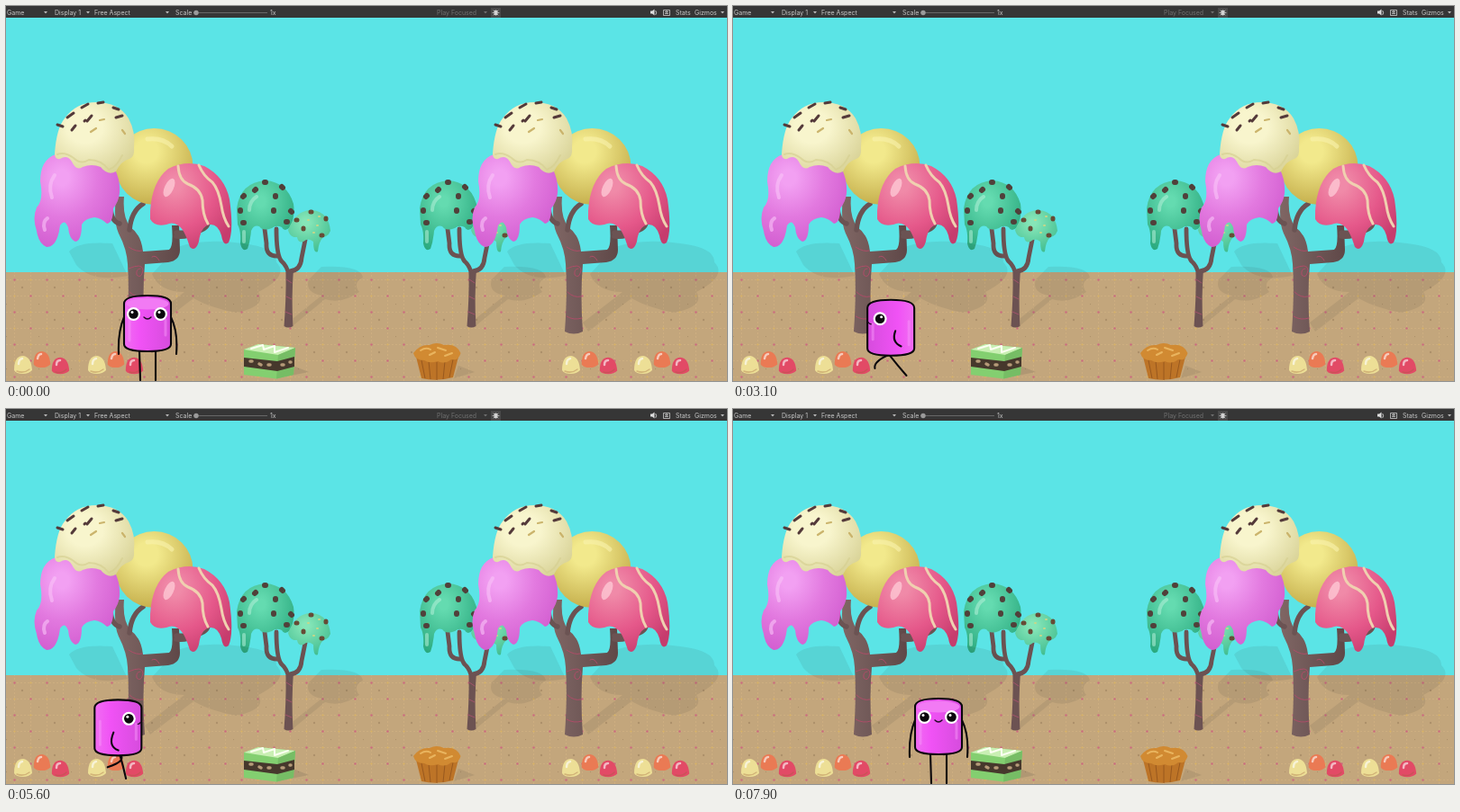
Recreate the animation shown at these times as an HTML page. Size 800x417 px, loop 8000 ms.

```html
<!DOCTYPE html>
<html lang="en">
<head>
<meta charset="utf-8">
<title>Candy walk</title>
<style>
html, body { margin: 0; height: 100%; overflow: hidden; background: #5be4e6; }
svg { display: block; width: 100%; height: 100%; }
text { font: 7px Inter, "Open Sans", sans-serif; fill: #c8c8c8; }
.line { fill: none; stroke-linecap: round; stroke-linejoin: round; }
.ink { stroke: #0b080c; stroke-width: 2.1; }
</style>
</head>
<body>
<svg viewBox="0 0 800 417" preserveAspectRatio="none">
<defs>
  <radialGradient id="cream" cx=".38" cy=".35" r=".75"><stop offset=".3" stop-color="#f8f5cd"/><stop offset="1" stop-color="#d8d296"/></radialGradient>
  <radialGradient id="lemon" cx=".4" cy=".3" r=".75"><stop offset=".2" stop-color="#f2e98c"/><stop offset="1" stop-color="#c2ab48"/></radialGradient>
  <radialGradient id="pink" cx=".32" cy=".25" r=".85"><stop offset=".1" stop-color="#f2a0f2"/><stop offset=".5" stop-color="#e279df"/><stop offset="1" stop-color="#cf58cd"/></radialGradient>
  <radialGradient id="berry" cx=".3" cy=".25" r=".85"><stop offset=".1" stop-color="#f08aa8"/><stop offset=".6" stop-color="#e5588a"/><stop offset="1" stop-color="#c63c6d"/></radialGradient>
  <radialGradient id="mint" cx=".42" cy=".3" r=".75"><stop offset=".1" stop-color="#64dbb0"/><stop offset="1" stop-color="#2aa97e"/></radialGradient>
  <radialGradient id="mint2" cx=".42" cy=".3" r=".75"><stop offset=".1" stop-color="#86e6b8"/><stop offset="1" stop-color="#41bd90"/></radialGradient>
  <linearGradient id="bark"><stop offset="0" stop-color="#7f6664"/><stop offset="1" stop-color="#5f4848"/></linearGradient>
  <linearGradient id="mallow"><stop offset="0" stop-color="#f16df2"/><stop offset=".35" stop-color="#f052f5"/><stop offset="1" stop-color="#d64cdd"/></linearGradient>

  <pattern id="waffle" width="36" height="36" y="295" patternUnits="userSpaceOnUse">
    <path d="M0 9.5H36M0 27.5H36M9.5 0V36M27.5 0V36" stroke="#cdae80" stroke-width="1" stroke-dasharray="2 2"/>
    <g fill="#cb6c7e"><circle cx="9.5" cy="9.5" r="1.2"/><circle cx="27.5" cy="27.5" r="1.2"/></g>
    <g fill="#d8b264"><circle cx="27.5" cy="9.5" r="1.1"/><circle cx="9.5" cy="27.5" r="1.1"/></g>
    <g fill="#ac906a"><circle cx="18" cy="18" r="1.2"/><circle cx="0" cy="0" r="1.2"/></g>
  </pattern>

  <g id="bigTree">
    <path d="M70 273Q80 261 118 264L135 300Q95 308 78 288ZM154 352L198 318Q170 318 162 298L190 268Q220 258 262 264Q300 268 300 285Q315 300 280 318Q290 334 255 341Q225 335 208 325L160 362Z" fill="#302f35" opacity=".09"/>
    <path d="M134 362Q137 320 135 287Q134 270 125 253Q119 240 122 212H131Q129 234 138 246Q150 254 152 273L181 271Q186 268 184 244H192L193 271Q193 283 180 285L154 287Q151 322 154 362Q144 367 134 362Z" fill="url(#bark)"/>
    <path class="line" d="M126 242Q115 239 116 218M137 249Q139 228 152 220M189 256Q206 258 213 246M189 252Q220 254 224 242" stroke="#6b5353" stroke-width="5.500"/>
    <path class="line" d="M136 268Q145 274 151 272M136 292Q152 285 152 294Q150 304 145 299Q144 292 149 292M137 318Q144 325 152 323M136 345Q144 350 153 347M162 279Q166 276 170 283" stroke="#ad4d68" stroke-width="1"/>
    <ellipse cx="164.500" cy="178.500" rx="43" ry="42.500" fill="url(#lemon)"/>
    <path class="line" d="M157 148Q174 146 184 156" stroke="#faf4ae" stroke-width="5" opacity=".6"/>
    <path d="M38 195Q38 171 55 165H110Q117 172 121 182Q127 194 126 208Q125 218 119 225Q119 241 112 242Q106 236 98 235Q88 236 84 243Q84 261 77 262Q70 259 69 246Q65 236 60 244Q57 268 45 268Q36 264 34 250Q29 236 34 224Q42 216 38 195Z" fill="url(#pink)"/>
    <path class="line" d="M54 188Q46 199 51 213M46 236Q40 240 43 249" stroke="#fbc4f9" stroke-width="4" opacity=".6"/>
    <path d="M160 228Q162 195 180 181Q200 171 220 178Q243 190 248 215Q253 250 247 263Q241 268 239 255Q235 242 226 243Q216 245 214 262Q210 274 204 268Q200 255 196 249Q188 238 178 243Q165 246 160 237Z" fill="url(#berry)"/>
    <path class="line" d="M191 178Q192 194 202 198Q216 203 218 216Q218 232 224 242M214 177Q219 189 229 196Q236 204 239 222Q241 236 247 245" stroke="#f0d0b0" stroke-width="3"/>
    <ellipse cx="181" cy="202" rx="5" ry="11" transform="rotate(25 181 202)" fill="#ffd0da" opacity=".7"/>
    <path d="M54 164Q56 136 65 125Q78 107 100 107Q125 107 136 125Q144 140 142 157Q143 168 137 170Q128 172 122 184Q113 189 105 179Q95 175 85 179Q78 184 73 173Q68 165 60 170Q54 171 54 164Z" fill="url(#cream)"/>
    <path class="line" d="M57 165Q65 162 75 169Q83 177 92 171Q106 171 114 182Q122 180 129 166" stroke="#d6d091" stroke-width="2" opacity=".65"/>
    <path class="line" d="M84 113L91 109M102 108L108 107M119 113L125 115M68 124L75 119M90 128L95 122M57 132L63 134M73 138L77 133M122 124L129 122M88 127L87 128" stroke="#543a3a" stroke-width="3"/>
    <path class="line" d="M104 127L109 126M94 140L100 136M129 138L132 142" stroke="#cbb46c" stroke-width="2.200"/>
  </g>

  <g id="mintTree">
    <path d="M319 347L350 322Q331 318 336 304L350 290Q394 288 396 302Q384 308 392 318Q372 332 354 326L319 355Z" fill="#302f35" opacity=".09"/>
    <path d="M308.500 356Q311 325 310.500 296L319 292Q316.500 325 318.500 356Q313 359 308.500 356Z" fill="#6c5252"/>
    <path class="line" d="M314 300Q312 289 306 284Q300 278 300 248M302 278Q288 279 289 264L287 248M315 295Q327 294 328 280L332 260" stroke="#6c5252" stroke-width="4.800"/>
    <path class="line" d="M311 304L317 308M311 323L317 326M310 340L317 343" stroke="#a2526a" stroke-width="1"/>
    <path d="M256 225Q260 196 288 194Q312 196 319 220Q321 235 315 246Q309 252 306 246Q300 243 295 247Q285 251 281 245Q275 243 272 250Q271 262 268 270Q262 274 260 264Q261 250 257 243Z" fill="url(#mint)"/>
    <path class="line" d="M278 212Q270 217 270 227M264 251V262" stroke="#b4f0d9" stroke-width="4" opacity=".55"/>
    <path d="M313 249Q322 226 340 227Q358 229 360 250Q358 256 352 257Q347 262 346 273Q341 276 341 262Q335 257 330 262Q324 264 323 257Q315 258 313 249Z" fill="url(#mint2)"/>
    <path class="line" d="M287 196h1M306 201l1 1M276 205l1-1M263 212l1-1M299 211v1M316 228l1 1M260 227v1M297 227v1M263 241h1M311 240h1" stroke="#51403a" stroke-width="6"/>
    <path class="line" d="M338 229h1M330 247v1M355 236v1M350 255h1M322 238h1" stroke="#674b36" stroke-width="5"/>
    <path class="line" d="M335 238h1M345 244h1M341 252h1M347 234h1" stroke="#c7d789" stroke-width="2"/>
  </g>

  <path id="drop" d="M-10 6Q-10-10 0-10Q9-9 10 6Q6 10 0 10Q-8 10-10 6Z"/>
  <g id="candies">
    <use href="#drop" transform="translate(40 393) scale(.93 .9)" fill="#ea7a54"/>
    <use href="#drop" x="19" y="399" fill="#eddf96"/>
    <use href="#drop" transform="translate(60.500 400) scale(.97 .93)" fill="#e24a66"/>
    <path class="line" d="M14 398Q14 393 18 392M35 392Q36 387 39 387M56 399Q56 394 60 394" stroke="#fff" stroke-width="2.500" opacity=".6"/>
    <path class="line" d="M12 406Q20 409 26 404M55 407Q62 409 67 404" stroke="#9d623e" stroke-width="1.500" opacity=".35"/>
  </g>

  <g id="body">
    <path class="ink" d="M-26 331Q-26 322 0 322Q26 322 26 331V376Q26 384 0 384Q-26 384-26 376Z" fill="url(#mallow)"/>
    <path class="line" d="M-20 346V372M20 349V366" stroke="#f894f9" stroke-width="3" opacity=".5"/>
  </g>
  <g id="upright">
    <path class="line ink" d="M-26 346Q-33 362-32 387M26 346Q34 362 32 387M-9 383L-8 416M9 383V416"/>
    <use href="#body"/>
    <ellipse cy="331" rx="23.500" ry="6.500" fill="#f27af4"/>
  </g>
  <g id="eye"><circle r="7.500" fill="#fff"/><circle r="5.300" fill="#0b080c"/><circle cx="-1.500" cy="-2" r="1.500" fill="#fff"/></g>
  <g id="face">
    <use href="#eye" x="-15.500" y="342.500"/><use href="#eye" x="14.500" y="342.500"/>
    <path class="line" d="M-4 346Q0 350 4 346" stroke="#260a29" stroke-width="1.400"/>
  </g>
</defs>

<rect width="800" height="417" fill="#5be4e6"/>
<rect y="296" width="800" height="121" fill="#c3a67c"/>
<rect y="296" width="800" height="121" fill="url(#waffle)"/>

<use href="#mintTree"/><use href="#mintTree" x="203"/>
<use href="#bigTree"/><use href="#bigTree" x="486"/>
<use href="#candies"/><use href="#candies" x="82"/><use href="#candies" x="608"/><use href="#candies" x="688"/>

<g id="cake">
  <path d="M301 414L336 407L321 401Z" fill="#302f35" opacity=".13"/>
  <path d="M264 382L280 376L321 380L319 410L300 414.500L264 410Z" fill="#83cf70"/>
  <path d="M264 382L280 376L321 380L302 388Z" fill="#c9efb3"/>
  <path d="M302 388L321 380L319 410L300 414.500Z" fill="#76bd65"/>
  <path d="M264 391L301 395L320 390V401L301 406L264 401Z" fill="#46382c"/>
  <path class="line" d="M271 395h2M281 398l2 1M291 399h2M306 399h2M315 396h1" stroke="#b59a78" stroke-width="3.500"/>
  <path class="line" d="M272 381L285 377L286 382L298 378L298 385L313 380" stroke="#fbfff0" stroke-width="2"/>
</g>
<g id="muffin">
  <path d="M497 414L520 407L502 400Z" fill="#302f35" opacity=".1"/>
  <path d="M455 390L461 414Q478 418 496 413L502 390Z" fill="#bd7427"/>
  <path d="M461 394l4 20M469 395l2 20M478 396v20M487 395l-2 20M496 393l-4 20" stroke="#98581e" stroke-width="1"/>
  <path d="M452 386Q459 376 470 377Q478 373 486 377Q500 375 504.500 386Q502 395 494 393Q487 399 479 395Q470 398 464 394Q454 394 452 386Z" fill="#d18a32"/>
  <path class="line" d="M460 383Q466 379 471 382M479 380L488 383M470 388L476 385M487 389L495 386" stroke="#e9b45e" stroke-width="2"/>
</g>

<g id="hero"></g>

<rect width="800" height="13" fill="#363636"/>
<g id="bar"></g>
<path d="M208 7.500H290" stroke="#686868"/><circle cx="211" cy="7.500" r="2.700" fill="#9a9a9a"/>
<rect x="538" y="2" width="11" height="11" fill="#4a4a4a"/>
<path class="line" d="M541 5l5 5M546 5l-5 5M540 7.500h7" stroke="#ccc" stroke-width=".8"/><ellipse cx="543.500" cy="7.500" rx="2" ry="3" fill="#d2d2d2"/>
<path d="M715 5.500h2l2.500-2v7l-2.500-2h-2Z" fill="#ddd"/><path class="line" d="M721 5.500q1.500 2 0 4" stroke="#ddd" stroke-width=".9"/>
<path d="M729.500 4.500h7v6h-7ZM731 6.500h4M731 8.500h4M733 4.500v4" fill="none" stroke="#ccc" stroke-width=".8"/>
</svg>
<script>
const $ = id => document.getElementById(id);
const labels = [[1, 'Game'], [54, 'Display 1'], [98, 'Free Aspect'], [188, 'Scale'], [293, '1x'],
  [478, 'Play Focused', '#707070'], [743, 'Stats'], [764, 'Gizmos']];
$('bar').innerHTML = labels.map(([x, s, c = '#c8c8c8']) => `<text x="${x}" y="10" style="fill:${c}">${s}</text>`).join('') +
  [44, 91, 179, 532, 795].map(x => `<path d="M${x - 2} 6h4l-2 2.500Z" fill="${x === 532 ? '#707070' : '#bbb'}"/>`).join('');

const LOOP = 8000, STEP = 100, STRIDE = 700;
const LEFT = 42, RIGHT = 228;
const BACK = '<use href="#upright"/>', FRONT = BACK + '<use href="#face"/>';
// Each walk: start, end, starting place, pixels per ms
const walks = [[600, 1500, 157, .119], [2650, 4300, RIGHT, -.113], [4925, 6900, LEFT, .119]];

function leg(hipY, reach, lift) {
  const x = 3 + reach - 9 * lift, y = 411 - 13 * lift;
  return `M2 ${hipY}Q${3 + reach / 2 + 10 * lift} ${(hipY + y) / 2} ${x} ${y}`;
}

function walker(age) {
  const a = age / STRIDE * 2 * Math.PI, s = Math.sin(a), c = Math.cos(a);
  const bob = 6 * Math.abs(s), bend = 1 - Math.abs(s);
  return `<path class="line ink" d="${leg(383 + bob, 26 * s, Math.max(0, c))}${leg(383 + bob, -26 * s, Math.max(0, -c))}"/>
    <g transform="translate(0 ${bob})"><use href="#body"/>
    <use href="#eye" x="12" y="343"/>
    <path class="line" d="M22 349Q24 349 25 347" stroke="#260a29" stroke-width="1.400"/>
    <path class="line ink" d="M-5 ${356 + 3 * bend}Q${4 - 20 * bend} ${367 + 9 * bend} ${5 + 21 * s} ${372 + 8 * bend}"/></g>`;
}

function draw(now) {
  const t = Math.floor(now % LOOP / STEP) * STEP;
  let x = 157, pose = FRONT, flip = 1;
  for (const [start, end, from, speed] of walks) {
    if (t < start) break;
    x = Math.max(LEFT, Math.min(RIGHT, from + speed * (Math.min(t, end) - start)));
    pose = x === LEFT ? BACK : FRONT;
    if (t < end) {
      flip = Math.sign(speed);
      x += 2 * flip;
      pose = walker(t - start);
    }
  }
  $('hero').setAttribute('transform', `translate(${x} 0) scale(${flip} 1)`);
  $('hero').innerHTML = pose;
}

const begin = performance.now();
function tick() {
  draw(performance.now() - begin);
  requestAnimationFrame(tick);
}
tick();
</script>
</body>
</html>
```
